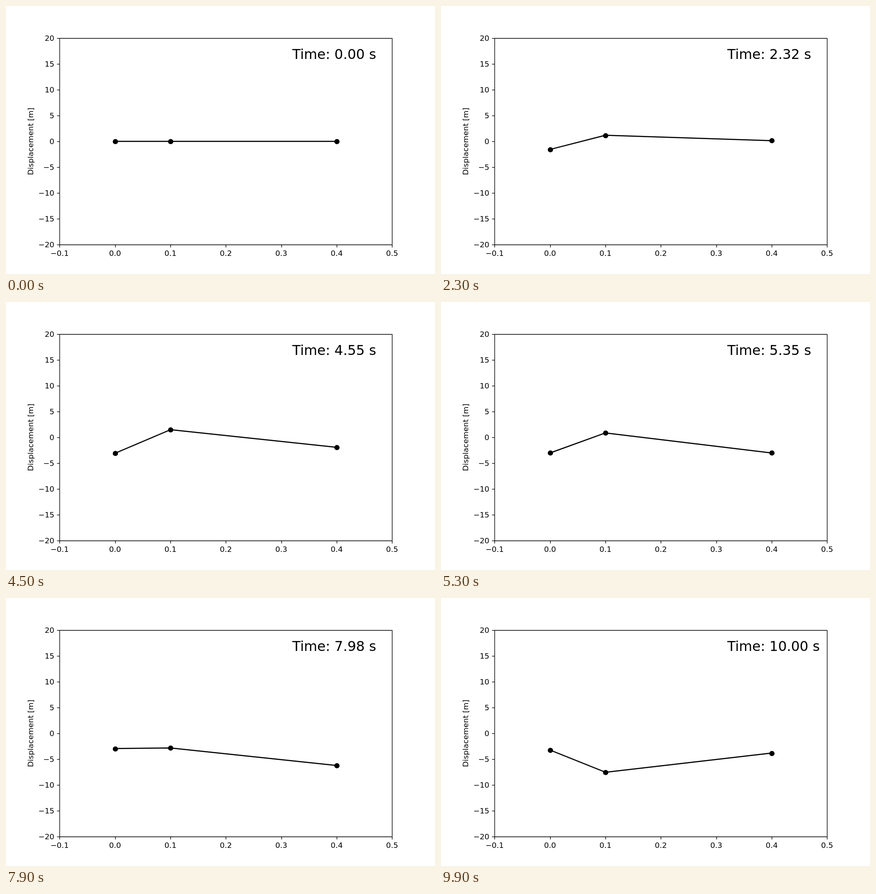
An HTML page with a canvas for the animation above (10 s loop, 947x592 px).

```html
<!DOCTYPE html>
<html lang="en">
<head>
<meta charset="utf-8">
<title>Displacement over time</title>
<style>
html, body { margin: 0; width: 100%; height: 100%; overflow: hidden; background: #fff; }
canvas { display: block; }
</style>
</head>
<body>
<canvas id="plot" width="947" height="592"></canvas>
<script>
const ctx = document.getElementById("plot").getContext("2d");
const W = 947, H = 592, STEPS = 100, STEP_MS = 100, DURATION = 10;
const box = { l: 0.125 * W, r: 0.9 * W, t: 0.12 * H, b: 0.89 * H };
const FONT = '"DejaVu Sans", sans-serif';

const toX = v => box.l + (v + 0.1) / 0.6 * (box.r - box.l);
const toY = v => box.b - (v + 20) / 40 * (box.b - box.t);
const snap = v => Math.round(v) + 0.5;
const toTime = step => step * DURATION / (STEPS - 1);

// Slow drift of each mass at a few shared times; the first also vibrates
const times = [0, 23, 37, 53, 65, 79, 99].map(toTime);
const masses = [
  { x: 0, drift: [0, -1.68, -2.48, -3.2, -2.48, -2.8, -3.49], amp: 0.25 },
  { x: 0.1, drift: [0, 1.18, 1.73, 0.86, -0.69, -2.84, -7.54], amp: 0 },
  { x: 0.4, drift: [0, 0.13, -1.01, -3.03, -5.02, -6.23, -3.83], amp: 0 }
];

const rate = (v, i) => (v[i + 1] - v[i]) / (times[i + 1] - times[i]);

function slope(v, i) {
  const last = times.length - 1;
  if (i === 0) return 1.5 * rate(v, 0) - 0.5 * slope(v, 1);
  if (i === last) return 1.5 * rate(v, last - 1) - 0.5 * slope(v, last - 1);
  const before = times[i] - times[i - 1], after = times[i + 1] - times[i];
  return (rate(v, i - 1) * after + rate(v, i) * before) / (before + after);
}

// Cubic Hermite interpolation
function smooth(v, t) {
  let i = 0;
  while (i < times.length - 2 && t > times[i + 1]) i++;
  const h = times[i + 1] - times[i], s = (t - times[i]) / h, r = 1 - s;
  return v[i] * r * r * (1 + 2 * s) + v[i + 1] * s * s * (3 - 2 * s)
    + h * s * r * (slope(v, i) * r - slope(v, i + 1) * s);
}

const position = (m, t) => smooth(m.drift, t) - m.amp * Math.sin(4.25 * t);

function line(points, width) {
  ctx.lineWidth = width;
  ctx.beginPath();
  points.forEach(([x, y]) => ctx.lineTo(x, y));
  ctx.stroke();
}

function text(str, x, y, size, align) {
  ctx.font = size + "px " + FONT;
  ctx.textAlign = align;
  ctx.fillText(str, x, y);
}

const label = (v, digits) => v.toFixed(digits).replace("-", "\u2212");

function drawAxes() {
  const l = snap(box.l), r = snap(box.r), t = snap(box.t), b = snap(box.b);
  const tick = 5.83, thin = 4 / 3, size = 50 / 3;
  ctx.lineWidth = thin;
  ctx.strokeRect(l, t, r - l, b - t);
  for (let i = -1; i <= 5; i++) {
    const x = toX(i / 10);
    line([[snap(x), b], [snap(x), b + tick]], thin);
    text(label(i / 10, 1), x, 552, size, "center");
  }
  for (let v = -20; v <= 20; v += 5) {
    const y = toY(v);
    line([[l, snap(y)], [l - tick, snap(y)]], thin);
    text(label(v, 0), box.l - 2 * tick, Math.round(y + 6), size, "right");
  }
  ctx.save();
  ctx.translate(60, toY(0));
  ctx.rotate(-Math.PI / 2);
  text("Displacement [m]", 0, 0, size, "center");
  ctx.restore();
}

function draw(step) {
  const t = toTime(step);
  ctx.fillStyle = "#fff";
  ctx.fillRect(0, 0, W, H);
  ctx.fillStyle = ctx.strokeStyle = "#000";
  ctx.lineJoin = "round";
  drawAxes();
  const points = masses.map(m => [toX(m.x), toY(position(m, t))]);
  line(points, 2.5);
  for (const [x, y] of points) {
    ctx.beginPath();
    ctx.arc(snap(x), snap(y), 5.83, 0, 2 * Math.PI);
    ctx.fill();
  }
  text("Time: " + t.toFixed(2) + " s", 632, 117, 30, "left");
}

const start = performance.now();
function tick() {
  draw(Math.floor((performance.now() - start) / STEP_MS) % STEPS);
  requestAnimationFrame(tick);
}
tick();
</script>
</body>
</html>
```
